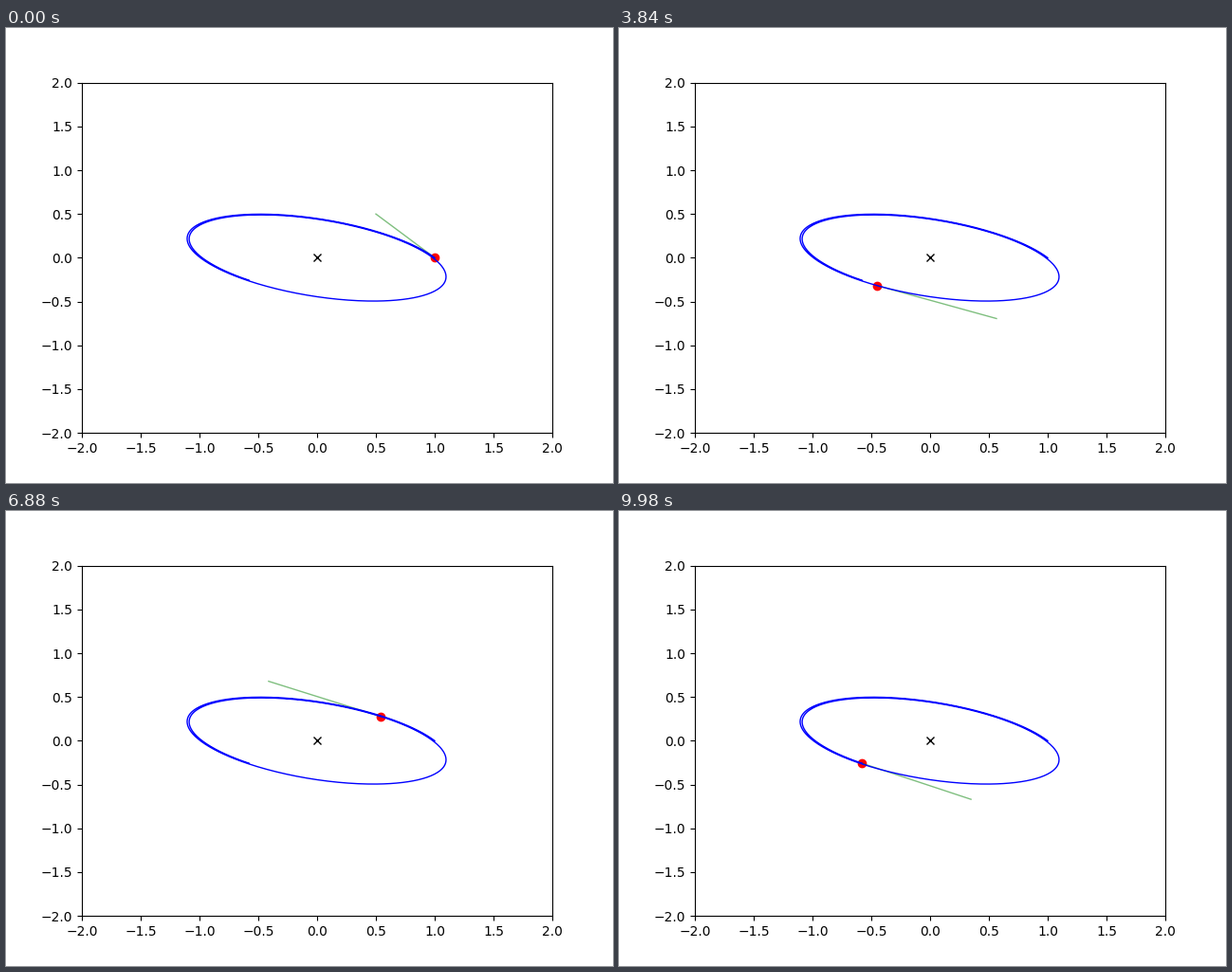
A matplotlib script for the animation above (10000 ms loop, 640 by 480 pixels).

```python
import numpy as np
import matplotlib.pyplot as plt
from matplotlib.animation import FuncAnimation

FRAMES = 500
DT = 0.02
DRAG = 0.005


def simulate():
    """Spring pull towards the centre with a little drag, semi-implicit Euler."""
    pos = np.zeros((FRAMES, 2))
    vel = np.zeros((FRAMES, 2))
    pos[0] = 1.0, 0.0
    vel[0] = -0.5, 0.5
    for n in range(1, FRAMES):
        pos[n] = pos[n - 1] + DT * vel[n - 1]
        vel[n] = vel[n - 1] - DT * (pos[n] + DRAG * vel[n - 1])
    return pos, vel


pos, vel = simulate()

fig, ax = plt.subplots(figsize=(6.4, 4.8), dpi=100)
ax.set_xlim(-2, 2)
ax.set_ylim(-2, 2)

ax.plot([0], [0], "kx")
body, = ax.plot([], [], "ro")
arrow, = ax.plot([], [], "g-", lw=1, alpha=0.5)
ax.plot(pos[:, 0], pos[:, 1], "b-", lw=1)


def update(n):
    tip = pos[n] + vel[n]
    body.set_data([pos[n, 0]], [pos[n, 1]])
    arrow.set_data([pos[n, 0], tip[0]], [pos[n, 1], tip[1]])
    return body, arrow


anim = FuncAnimation(fig, update, frames=FRAMES, interval=20,
                     repeat=True, repeat_delay=0)
plt.show()
```
